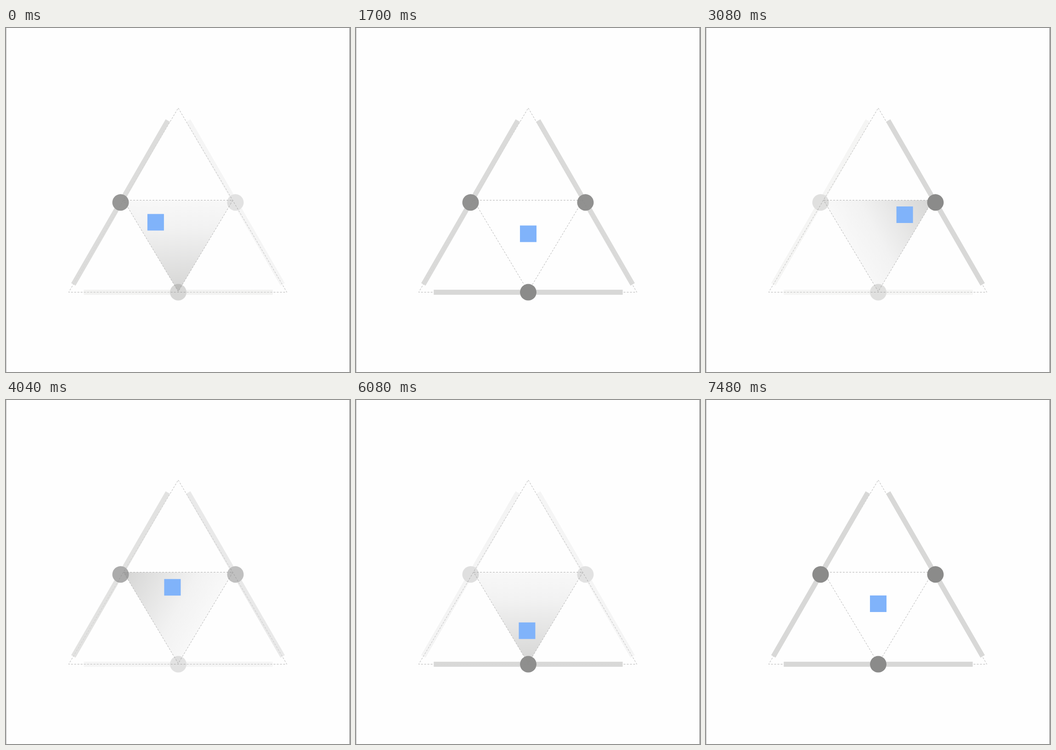
Write an HTML page with a canvas that moves like this. It is 749x748 px and loops after 7780 ms.

```html
<!DOCTYPE html>
<html lang="en">
<head>
<meta charset="utf-8">
<title>Triangle states</title>
<style>
  html, body { margin: 0; width: 100%; height: 100%; overflow: hidden; background: #fefefe; }
  canvas { display: block; }
</style>
</head>
<body>
<canvas id="stage" width="749" height="748"></canvas>
<script>
const ctx = document.getElementById('stage').getContext('2d');
const LOOP = 7780, LAST_MOVE = 7480, DIM = 0.24;

const outer = [[375, 174], [611.5, 574.5], [136.5, 574.5]];
const inner = [[256, 374.5], [494, 374.5], [375, 573]];

// Square position, handle opacities [left, right, bottom] and shading axis per state.
const states = {
  left:   { pos: [300, 391],     glow: [1, DIM, DIM], shade: [435, 473, 256, 374] },
  right:  { pos: [417, 386.5],   glow: [DIM, 1, DIM], shade: [315, 473, 494, 374] },
  bottom: { pos: [357, 488],     glow: [DIM, DIM, 1], shade: [375, 374, 375, 573] },
  center: { pos: [357, 424.5],   glow: [1, 1, 1],     shade: null }
};

const handles = [
  { x: 249.5, y: 379.3, angle: -Math.PI / 3 },
  { x: 499.5, y: 379.3, angle: Math.PI / 3 },
  { x: 375,   y: 574.6, angle: 0 }
];

const legs = [
  { start: -137, duration: 1097, from: 'left',   to: 'bottom' },
  { start: 1040, duration: 1000, from: 'bottom', to: 'center' },
  { start: 2030, duration: 1400, from: 'center', to: 'right' },
  { start: 3520, duration: 1450, from: 'right',  to: 'left' },
  { start: 5020, duration: 1443, from: 'left',   to: 'bottom' },
  { start: 6600, duration: 1000, from: 'bottom', to: 'center' }
];

const mix = (a, b, p) => a + (b - a) * p;
const mixAll = (a, b, p) => a.map((v, i) => mix(v, b[i], p));

// cubic-bezier(.25, .1, .25, 1)
function ease(x) {
  if (x <= 0) return 0;
  if (x >= 1) return 1;
  let lo = 0, hi = 1;
  for (let i = 0; i < 24; i++) {
    const s = (lo + hi) / 2;
    if (0.75 * s * (1 - s) + s ** 3 < x) lo = s; else hi = s;
  }
  const s = (lo + hi) / 2, r = 1 - s;
  return 0.3 * s * r * r + 3 * r * s * s + s ** 3;
}

function trace(points) {
  ctx.beginPath();
  points.forEach(([x, y]) => ctx.lineTo(x, y));
  ctx.closePath();
}

function drawDashes(points) {
  trace(points);
  ctx.setLineDash([4, 3]);
  ctx.lineWidth = 1;
  ctx.strokeStyle = '#b0b0b0';
  ctx.stroke();
}

function drawShade(axis) {
  const gradient = ctx.createLinearGradient(...axis);
  gradient.addColorStop(0, '#f8f8f8');
  gradient.addColorStop(0.3, '#f2f2f2');
  gradient.addColorStop(1, '#d5d5d4');
  trace(inner);
  ctx.fillStyle = gradient;
  ctx.fill();
}

function drawHandle({ x, y, angle }, alpha) {
  ctx.save();
  ctx.globalAlpha = alpha;
  ctx.translate(x, y);
  ctx.rotate(angle);
  ctx.fillStyle = '#d8d8d7';
  ctx.fillRect(-205.7, -5.5, 188.2, 11);
  ctx.fillRect(17.5, -5.5, 188.2, 11);
  ctx.fillStyle = '#8b8b8a';
  ctx.beginPath();
  ctx.arc(0, 0, 18, 0, Math.PI * 2);
  ctx.fill();
  ctx.restore();
}

function draw(time) {
  const t = Math.min(time % LOOP, LAST_MOVE);
  const leg = legs.filter(l => l.start <= t).pop();
  const p = ease((t - leg.start) / leg.duration);
  const from = states[leg.from], to = states[leg.to];

  ctx.fillStyle = '#fefefe';
  ctx.fillRect(0, 0, 749, 748);
  ctx.fillStyle = '#b8b8b8';
  ctx.fillRect(0, 0, 1, 748);
  ctx.fillStyle = '#707070';
  ctx.fillRect(748, 0, 1, 748);

  if (to.shade) drawShade(to.shade);
  drawDashes(outer);
  drawDashes(inner);

  const glow = mixAll(from.glow, to.glow, p);
  handles.forEach((handle, i) => drawHandle(handle, glow[i]));

  const [x, y] = mixAll(from.pos, to.pos, p);
  ctx.fillStyle = '#80b3fa';
  ctx.fillRect(x, y, 36, 36);
}

const begin = performance.now();
function tick() {
  draw(performance.now() - begin);
  requestAnimationFrame(tick);
}
tick();
</script>
</body>
</html>
```
